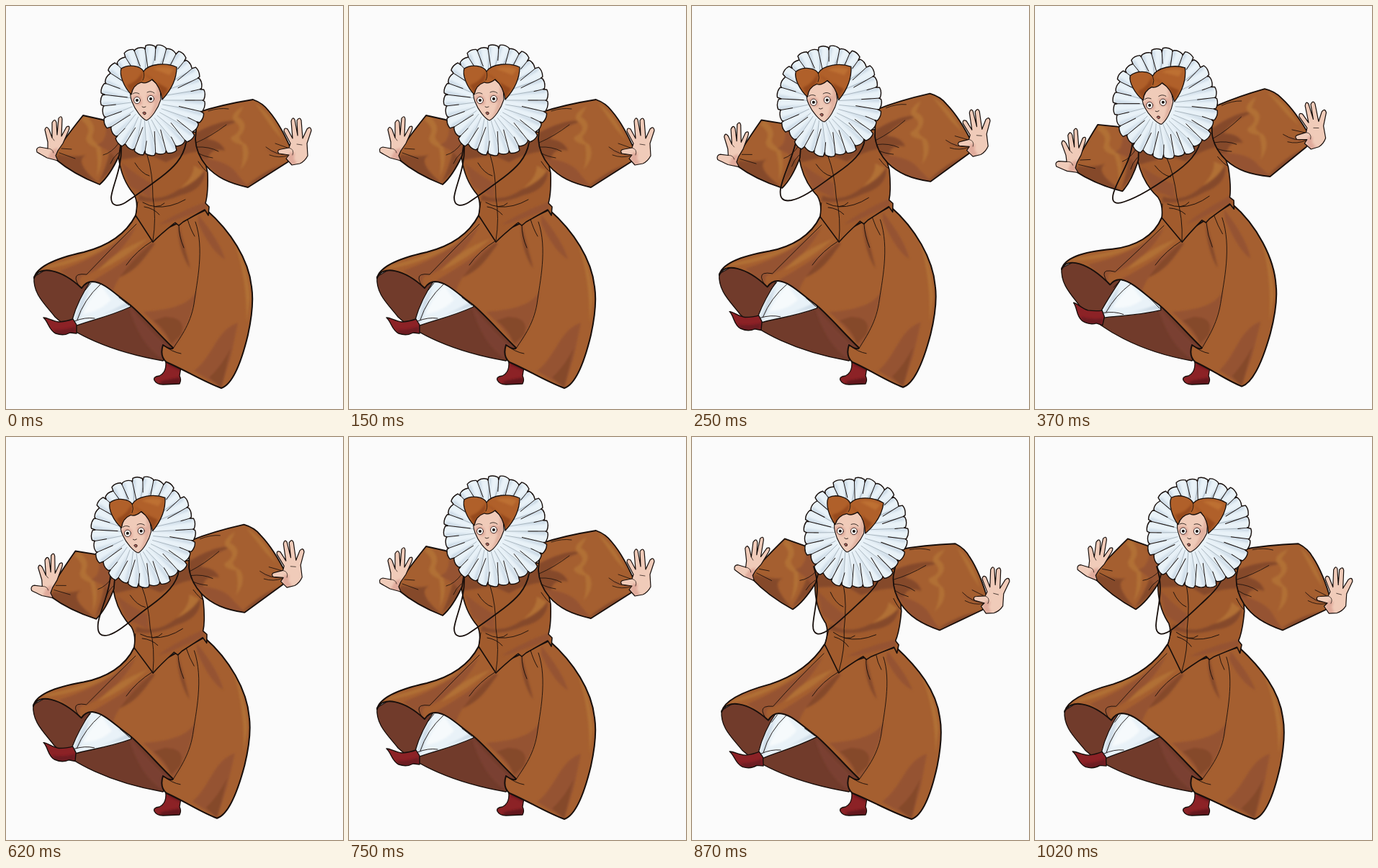
Write an HTML page that moves like this. It is 468 px wide and 560 px high and loops after 1.12 s.

```html
<!DOCTYPE html>
<html lang="en">
<head>
<meta charset="utf-8">
<title>Dancing courtier</title>
<style>
html, body { margin: 0; width: 100%; height: 100%; overflow: hidden; background: #fbfbfb; }
svg { display: block; width: 468px; height: 560px; }
</style>
</head>
<body>
<svg id="stage" viewBox="0 0 468 560" stroke-linejoin="round" stroke-linecap="round">
  <defs><filter id="soft"><feGaussianBlur stdDeviation="1.5"/></filter></defs>
</svg>
<script>
const INK = '#170e0b', CLOTH = '#a55f30', DARK = '#85482b', MID = '#955331', LIGHT = '#b17035';
const LINING = '#713b2b', WHITE = '#e9f2f8', SHADE = '#cddbe7', SKIN = '#f0cbb9', BLUSH = '#e0aa9b', RED = '#8c2226';
const PIVOT = [205, 325], KNEE = [148, 430];

// lean: body angle, swing: hem shift, lift: left hem rise, kick: leg angle, nod: head shift
const rest = { lean: 0, swing: 0, lift: 0, kick: 0, nod: [0, 0] };
const left = { lean: -3.6, swing: -6, lift: -4, kick: 5, nod: [-1, 1] };
const farLeft = { lean: -6.8, swing: -12, lift: -12, kick: 12.4, nod: [0, 3] };
const right = { lean: 7, swing: 6, lift: 4, kick: -2.4, nod: [0, 1] };

const cords = {
  rest: 'M160,190 C162,225 148,248 146,266 C146,279 156,279 166,273 C184,261 199,250 215,238 C232,225 246,212 250,190',
  left: 'M144,190 C138,215 126,236 123,254 C121,268 127,272 138,270 C157,266 177,249 200,233 C222,218 238,204 240,185',
  farLeft: 'M135,192 C133,216 114,242 109,260 C105,274 113,276 124,272 C145,265 166,251 188,236 C212,220 229,204 231,180',
  back: 'M145,192 C144,217 131,240 128,258 C126,274 132,278 143,275 C159,270 176,252 200,235 C222,219 238,204 240,185',
  right: 'M169,180 C180,212 169,240 168,262 C168,276 177,276 188,269 C205,257 222,240 238,225 C252,212 262,200 262,184'
};

const clamp = v => Math.max(0, Math.min(1, v));
const path = (d, fill = 'none', w = 0, ink = INK) =>
  `<path d="${d}" fill="${fill}"${w ? ` stroke="${ink}" stroke-width="${w}"` : ''}/>`;
const lines = (list, w = 1) => list.map(d => path(d, 'none', w)).join('');
const group = (move, ...parts) => `<g transform="${move}">${parts.join('')}</g>`;

// A filled shape with soft shading kept inside its outline.
let clips = 0;
function part(d, fill, shades = [], w = 1.6) {
  const id = 'clip' + clips++;
  const inner = shades.map(([c, s]) => path(s, c)).join('');
  return `<clipPath id="${id}"><path d="${d}"/></clipPath>` + path(d, fill) +
    `<g clip-path="url(#${id})"><g filter="url(#soft)">${inner}</g></g>` + path(d, 'none', w);
}

const warp = (d, shift) => d.replace(/(-?[\d.]+),(-?[\d.]+)/g, (_, x, y) => {
  const [dx, dy] = shift(+x, +y);
  return (+x + dx).toFixed(1) + ',' + (+y + dy).toFixed(1);
});

// Skirt points: the waist follows the body, the hem swings.
function bend(d, pose) {
  const r = pose.lean * Math.PI / 180;
  return warp(d, (x, y) => {
    const top = clamp((345 - y) / 55) * clamp((x - 120) / 60);
    const hem = clamp((x - 230) / 70) * clamp((y - 285) / 246) ** 0.75;
    const side = clamp((140 - x) / 90);
    return [
      -r * (y - PIVOT[1]) * top + pose.swing * hem + pose.lean * 0.3 * side,
      r * (x - PIVOT[0]) * top + pose.lift * side + Math.min(0, pose.swing) * 0.2 * hem
    ];
  });
}

// Leg points: the ankle turns fully, the thigh stays under the skirt.
function kick(d, pose) {
  return warp(d, (x, y) => {
    const r = pose.kick * Math.PI / 180 * clamp((y - 380) / 45);
    const u = x - KNEE[0], v = y - KNEE[1];
    return [u * Math.cos(r) - v * Math.sin(r) - u, u * Math.sin(r) + v * Math.cos(r) - v];
  });
}

function skirt(pose) {
  const b = d => bend(d, pose), k = d => kick(d, pose);
  const lining = part(b('M39,376 C37,400 54,414 68,432 C92,454 142,480 218,493 L236,474 L172,412 L118,380 L66,360 Z'), LINING,
    [['#7a4130', b('M170,415 Q200,452 226,474 L216,490 Q184,468 170,415 Z')]], 1.3);
  const boot = part('M221,490 C224,502 220,511 213,514 Q204,515 206,520 Q209,526 218,526 L241,525 Q244,519 241,514 L244,496 Z', RED,
    [['#64161d', 'M223,490 L244,499 L242,507 L226,499 Z M216,521 L242,516 L242,527 L212,527 Z']], 1.3);
  const leg = part(k('M119,380 C106,399 97,418 92,436 L96,445 C112,438 140,433 173,418 L170,390 Z'), WHITE, [
    [SHADE, k('M116,389 L103,411 L94,443 L101,437 L109,412 Z M105,440 Q144,425 172,417 L176,406 Q150,425 105,440 Z M145,388 L174,407 L158,408 Z')],
    ['#f6fafc', k('M132,388 Q114,408 107,428 Q132,424 146,408 Z')]], 1.3) +
    lines([k('M131,387 Q108,408 99,436'), k('M157,405 L171,416'), k('M95,438 Q110,432 123,434')], 0.9);
  const shoe = part(k('M52,433 C58,433 64,438 74,439 Q85,438 93,435 L98,443 L98,455 L89,454 Q80,459 69,455 C59,450 59,439 52,433 Z'), RED,
    [['#6d1a20', k('M66,450 Q82,451 97,445 L96,459 L70,459 Z')]], 1.4);
  const gown = part(b('M180,291 C166,318 139,334 108,342 C76,349 43,360 39,378 C46,360 76,365 105,392 C109,386 113,383 120,383 C137,384 151,400 172,415 C190,430 211,455 232,475 Q230,479 218,471 Q213,487 223,495 C249,506 274,522 299,531 C317,525 329,486 336,457 C343,425 343,403 341,390 C337,352 312,313 278,283 L204,318 Z'), CLOTH, [
    [MID, b('M181,306 Q137,346 75,368 L104,391 Q98,374 112,374 Q159,350 181,306 Z')],
    [LIGHT, b('M156,324 Q108,348 57,361 L51,366 Q111,357 156,324 Z')],
    [DARK, b('M204,329 C183,339 165,354 158,377 C184,366 194,347 207,330 Z')],
    [MID, b('M207,325 C169,360 155,376 148,398 L120,382 Q158,360 207,325 Z')],
    [LIGHT, b('M197,323 Q152,339 128,368 Q164,352 197,323 Z')],
    [DARK, b('M239,300 C238,324 244,348 256,365 Q247,331 239,300 Z')],
    [MID, b('M265,395 C258,410 240,422 190,425 Q213,445 233,475 Q258,440 265,395 Z')],
    [DARK, b('M220,432 Q252,432 243,457 L229,470 Q223,450 205,437 Z')],
    [MID, b('M267,302 C281,333 294,346 304,352 Q297,327 267,290 Z')],
    [LIGHT, b('M318,330 Q336,360 339,405 L334,440 Q335,380 318,330 Z')],
    [MID, b('M261,507 C289,486 290,452 322,440 L312,488 L299,530 Z')],
    [DARK, b('M282,516 Q300,500 312,475 L299,531 Z')]
  ], 2);
  const folds = lines([
    'M263,300 C276,337 265,384 261,414 C256,444 240,463 232,476',
    'M181,303 Q145,338 112,373 Q96,371 97,379 Q99,388 105,392',
    'M204,326 Q181,340 167,360', 'M240,304 Q240,320 247,336', 'M252,296 Q256,310 262,320',
    'M218,471 Q231,481 243,483', 'M118,385 L110,395'
  ].map(b), 0.9);
  return boot + lining + leg + shoe + gown + folds;
}

function body() {
  const torso = part('M150,177 L156,207 C158,228 166,248 178,262 Q184,274 180,291 L204,328 C216,316 225,309 235,301 L240,305 L246,300 L276,283 L281,291 L282,279 L277,274 Q281,260 280,232 L268,175 Z', '#a15b2d', [
    [DARK, 'M150,180 H269 L267,202 Q243,205 222,217 L200,207 L158,214 Z'],
    [MID, 'M160,217 Q186,239 202,246 L201,267 Q187,258 172,251 Z'],
    [DARK, 'M185,262 Q211,275 240,255 Q261,248 276,229 Q276,255 242,263 Q213,276 183,270 Z'],
    [MID, 'M212,304 Q239,286 278,272 L278,282 L226,301 Z'],
    [LIGHT, 'M261,222 L274,229 Q266,243 242,253 Q261,238 261,222 Z']
  ]);
  const seams = lines(['M196,207 Q204,232 204,266 Q209,295 204,326', 'M190,273 Q210,284 220,274', 'M192,279 Q205,281 213,290',
    'M179,218 Q188,233 199,236', 'M267,216 Q275,228 279,230', 'M183,272 L180,291', 'M207,279 Q228,281 249,269'], 0.9);
  const sleeveL = part('M160,188 Q145,160 134,158 L107,152 Q91,172 78,190 Q67,206 69,213 Q94,234 130,248 Q144,236 157,208 Z', CLOTH, [
    [DARK, 'M73,206 Q96,211 111,207 Q93,216 128,246 L92,234 L66,214 Z'],
    [LIGHT, 'M105,159 Q119,169 112,181 Q108,190 125,197 Q129,216 126,237 Q138,214 130,194 Q116,185 121,177 Q126,165 110,151 Z'],
    [DARK, 'M157,166 L134,163 Q151,181 144,202 Q140,222 128,247 L157,216 Z'],
    [MID, 'M138,157 Q143,188 126,193 Q153,205 154,218 L164,189 Z']
  ], 1.8);
  const sleeveR = part('M266,148 C290,140 318,134 343,130 Q357,135 365,146 C377,160 388,180 398,204 Q396,213 391,217 L336,252 C309,246 292,238 278,222 Q264,205 263,185 Z', CLOTH, [
    [DARK, 'M264,176 Q302,156 325,160 Q293,168 279,185 Q299,187 304,201 Q279,196 281,219 L260,206 Z'],
    [LIGHT, 'M330,139 Q309,151 317,160 Q333,171 313,182 Q310,189 328,193 Q331,212 326,227 Q342,209 334,193 Q319,184 327,178 Q338,163 322,154 Z'],
    [MID, 'M270,211 Q311,215 322,235 L338,253 L302,245 Z'],
    [DARK, 'M331,252 Q365,224 393,218 L382,230 Z'],
    [LIGHT, 'M346,135 Q370,151 384,186 L370,170 Z'],
    [MID, 'M360,198 Q375,210 393,207 L390,199 L379,204 Z']
  ], 1.8);
  const creases = lines(['M74,204 L96,212', 'M77,198 L91,199', 'M157,190 Q147,204 135,207', 'M156,204 Q148,211 145,219',
    'M264,190 Q285,181 306,165', 'M265,196 Q282,195 295,202', 'M268,205 Q275,209 287,211', 'M281,146 Q296,141 309,143',
    'M361,196 Q376,208 390,206', 'M366,207 Q379,212 391,208', 'M374,191 L391,197'], 0.8);
  const handL = part('M72,215 L57,211 Q48,206 43,203 Q41,197 47,196 L58,198 L58,189 L54,172 Q56,165 60,172 L64,183 L64,162 Q68,155 70,162 L71,179 L73,156 Q77,151 78,157 L77,181 L84,168 Q90,165 87,173 L79,191 L72,201 L69,208 Z', SKIN,
    [[BLUSH, 'M64,200 L72,197 L70,215 L58,211 Z']], 1.2);
  const handR = part('M379,205 Q375,200 382,199 L393,197 L395,191 L386,174 Q386,168 391,171 L398,184 L396,160 Q398,153 401,158 L405,180 L404,159 Q408,153 410,159 L412,184 L418,171 Q423,166 424,173 L418,191 L419,208 Q415,216 408,219 L397,221 L389,212 L393,207 Z', SKIN,
    [[BLUSH, 'M395,203 L401,204 L400,212 L404,219 L396,222 L391,211 Z']], 1.2);
  const palm = lines(['M58,198 Q65,198 66,204', 'M393,197 Q401,199 398,207', 'M404,192 L411,193', 'M64,183 L67,187'], 0.7);
  return torso + seams + sleeveL + sleeveR + creases + handL + handR + palm;
}

function ruff() {
  const n = 29, step = 2 * Math.PI / n;
  const at = (t, r) => `${(204 + 72.5 * r * Math.cos(t)).toFixed(1)},${(131 + 77 * r * Math.sin(t)).toFixed(1)}`;
  const near = t => `${(196 + 22 * Math.cos(t)).toFixed(1)},${(131 + 28 * Math.sin(t)).toFixed(1)}`;
  let edge = '', shade = '', rib = '', thin = '';
  for (let i = 0; i < n; i++) {
    const t = i * step, peak = 0.99 + 0.025 * Math.sin(i * 2.7), dip = 0.94 + 0.015 * Math.cos(i * 1.9);
    edge += `${i ? 'L' : 'M'}${at(t, dip)} L${at(t + step * 0.1, peak)} Q${at(t + step * 0.5, peak + 0.03)} ${at(t + step * 0.95, peak - 0.02)} `;
    shade += `M${near(t)} L${at(t, dip)} L${at(t + step * 0.1, peak)} L${at(t + step * 0.35, 0.95)} Z `;
    rib += `M${at(t, 0.62 + 0.13 * Math.sin(i * 4.1))} L${at(t, dip)} `;
    thin += `M${near(t)} L${at(t, 0.8)} `;
  }
  return part(edge + 'Z', WHITE, [[SHADE, shade]], 1.4) +
    path(thin, 'none', 0.5, '#75848f') + path(rib, 'none', 0.95);
}

function head() {
  const face = part('M174,110 Q171,124 175,133 C179,144 189,157 195,159 C202,156 211,143 215,130 L214,112 L201,101 Z', SKIN, [
    [BLUSH, 'M174,127 Q181,121 188,127 L189,136 L185,138 L176,134 Z M195,124 Q203,120 210,126 Q208,137 197,134 Z'],
    ['#e0b09f', 'M210,108 L218,115 Q211,148 196,160 Q209,137 210,108 Z']
  ], 1.1);
  const hair = part('M174,123 C164,113 157,96 160,87 C170,80 187,83 191,91 C198,80 222,78 237,85 C237,102 229,117 217,130 C215,116 209,107 203,102 Q194,109 188,106 Q176,110 174,123 Z', '#b0602a', [
    ['#95481e', 'M190,91 Q191,99 186,107 L175,123 L168,110 Q183,105 190,91 Z M192,93 Q199,102 209,105 L217,129 L225,115 Q208,106 192,93 Z'],
    ['#bd7033', 'M204,87 Q221,82 233,88 L227,96 Z']
  ], 1.3);
  const eye = (x, y) => `<ellipse cx="${x}" cy="${y}" rx="4.5" ry="4.7" fill="#f6f3f0" stroke="#3b2521" stroke-width=".9"/>` +
    `<circle cx="${x}" cy="${y}" r="2" fill="${INK}"/>`;
  return face + hair + eye(182, 131) + eye(201, 129) +
    lines(['M176,122 Q180,119 185,122', 'M196,120 Q201,117 206,121', 'M189,140 Q191,142 194,140', 'M191,91 Q193,98 190,103'], 0.8) +
    path('M190,148 Q192,146 194,148 Q195,151 192,151 Z', '#a85d57', 0.8);
}

function scene(pose, cord) {
  const turn = `rotate(${pose.lean} ${PIVOT})`;
  return `<g visibility="hidden">${skirt(pose)}${group(turn, body())}${path(cord, 'none', 1.8)}` +
    group(`translate(${pose.nod}) ${turn}`, ruff(), head()) + '</g>';
}

const stage = document.getElementById('stage');
stage.insertAdjacentHTML('beforeend', [
  scene(rest, cords.rest), scene(left, cords.left), scene(farLeft, cords.farLeft),
  scene(left, cords.back), scene(right, cords.right)
].join(''));
const scenes = [...stage.children].slice(1);

// [end time, scene]
const steps = [[250, 0], [370, 1], [620, 2], [750, 3], [870, 0], [1120, 4]];
function draw() {
  const t = performance.now() % 1120;
  const now = steps.find(([end]) => t < end)[1];
  scenes.forEach((s, i) => s.setAttribute('visibility', i === now ? 'visible' : 'hidden'));
  requestAnimationFrame(draw);
}
draw();
</script>
</body>
</html>
```
